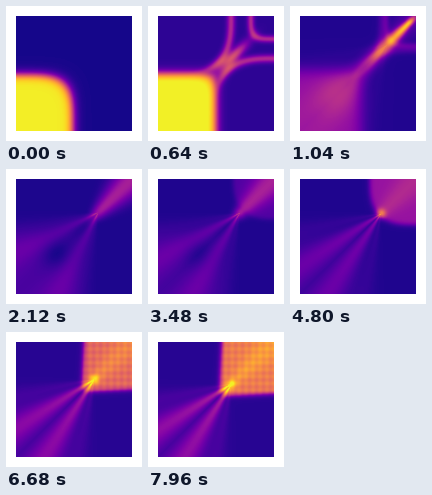
Recreate the animation shown at these times as a matplotlib script. Size 136 px wide and 135 px high, loop 8 s.

```python
import numpy as np
import matplotlib.pyplot as plt
from matplotlib.animation import FuncAnimation

W, H, DPI = 136, 135, 100
NX, NY = 116, 115
STEP, FRAMES = 40, 200

# a runs rightwards, b upwards; the field mirrors about the line a = b
a, b = np.meshgrid((np.arange(NX) + 0.5) / NX, 1 - (np.arange(NY) + 0.5) / NY)
c, e = 1 - a, 1 - b
s, d = (a + b) / 2, a - b


def gauss(x):
    return np.exp(-x * x)


def sigmoid(x):
    return 1 / (1 + np.exp(-np.clip(x, -40, 40)))


def rounded(x, y, n):
    return (np.abs(x) ** n + np.abs(y) ** n) ** (1 / n)


def track(t, *keys):
    times, values = zip(*keys)
    return np.interp(t, times, values)


def source_block(t):
    level = track(t, (0, .96), (720, .96), (860, .72), (1040, .27),
                  (1300, .17), (1680, .10), (3400, .07), (4800, .03))
    n = track(t, (0, 4), (640, 9))
    edge = track(t, (0, .49), (640, .5), (1040, .53))
    soft = track(t, (0, .022), (700, .022), (1040, .035), (1680, .05))
    return level * sigmoid((edge - rounded(a, b, n)) / soft)


def arms(t):
    level = track(t, (0, 0), (160, .06), (640, .34), (800, .3), (1040, .08), (1300, 0))
    size = track(t, (0, .52), (640, 1), (1040, 1.12))
    lines = sum(gauss((rounded(u / .63, (1 - v) / .53, 3) - size) / .055)
                for u, v in ((a, b), (b, a)))
    return level * lines * sigmoid((s - .47) / .03)


def corner_arc(t):
    level = track(t, (0, 0), (240, 0), (640, .34), (840, .3), (1040, .12), (1400, 0))
    radius = track(t, (240, .08), (640, .2), (1040, .26))
    return level * gauss((rounded(c, e, 4) - radius) / .03)


def pulse(t):
    level = track(t, (0, 0), (200, .04), (640, .48), (1040, .74),
                  (1240, .5), (1680, .08), (2000, 0))
    place = track(t, (0, .5), (640, .64), (1040, .93), (1400, 1.02))
    back = track(t, (640, .13), (1040, .3))
    front = track(t, (640, .13), (1040, .06))
    width = track(t, (640, .065), (1040, .04)) + .2 * np.maximum(place - s, 0)
    shape = np.where(s < place, gauss((s - place) / back), gauss((s - place) / front))
    return level * shape * gauss(d / width)


def glow(t):
    level = track(t, (840, 0), (1040, .08), (1300, 0))
    return level * gauss((s - .31) / .14) * gauss(d / .25)


def flare(t):
    level = track(t, (900, 0), (1100, .16), (1600, .36), (2120, .34),
                  (3400, .24), (4800, .08), (8000, .1))
    width = .06 + .42 * np.maximum(s - .66, 0)
    return level * sigmoid((s - .66) / .025) * gauss(d / width)


def fan(t, p):
    level = track(t, (900, 0), (1040, .06), (2120, .14), (3400, .17),
                  (4800, .23), (6680, .34), (8000, .36))
    spread = track(t, (1040, .1), (2120, .33), (4800, .2), (6680, .22))
    ahead = 2 * p - a - b
    angle = np.abs(np.arctan2(d, ahead))
    rho = np.hypot(a - p, b - p)
    rays = gauss((angle - spread) / .17) + .22 * gauss((angle - .58) / .12)
    fade = .6 + .5 * np.exp(-rho / .22)
    return level * rays * fade * sigmoid(ahead / .025)


def hollow(t):
    level = track(t, (1200, 0), (1900, .1), (3200, .08), (4500, 0))
    return -level * gauss((s - .35) / .1) * gauss(d / .18)


def target_block(t):
    level = track(t, (2200, 0), (3000, .05), (4000, .18), (4800, .29),
                  (6000, .5), (6680, .57), (7960, .63))
    size = track(t, (2200, .3), (4800, .4), (6680, .412), (7960, .447))
    n = track(t, (4000, 2.6), (4800, 2.9), (6680, 12))
    tilt = track(t, (4800, 0), (6680, .05))
    ripple = track(t, (4800, 0), (6680, .022))
    r = rounded(c - tilt * e, e - tilt * c, n)
    wave = np.cos(2 * np.pi * c / .06) + np.cos(2 * np.pi * e / .06)
    return (level + ripple * wave) * sigmoid((size - r) / .012)


def focus(t, p):
    level = track(t, (2200, 0), (3400, .1), (4800, .34), (6680, .3), (8000, .28))
    return level * gauss(np.hypot(a - p, b - p) / .04)


def field(t):
    p = track(t, (1040, .75), (2120, .71), (4800, .7), (6680, .676), (7960, .636))
    base = track(t, (0, .015), (640, .055), (1040, .035), (2120, .025),
                 (4800, .03), (6680, .045))
    block = source_block(t)
    lines = arms(t) + corner_arc(t) + pulse(t)
    v = base + block + lines * (1 - block) + glow(t) + hollow(t)
    v += flare(t) + fan(t, p) + target_block(t) + focus(t, p)
    return np.clip(v, 0, .98)


fig = plt.figure(figsize=(W / DPI, H / DPI), dpi=DPI, facecolor="white")
ax = fig.add_axes([10 / W, 10 / H, NX / W, NY / H])
ax.set_axis_off()
image = ax.imshow(field(0), cmap="plasma", vmin=0, vmax=1,
                  aspect="auto", interpolation="nearest")


def draw(i):
    image.set_data(field(i * STEP))
    return [image]


anim = FuncAnimation(fig, draw, frames=FRAMES, interval=STEP,
                     init_func=lambda: draw(0), repeat=True, repeat_delay=0)
plt.show()
```
